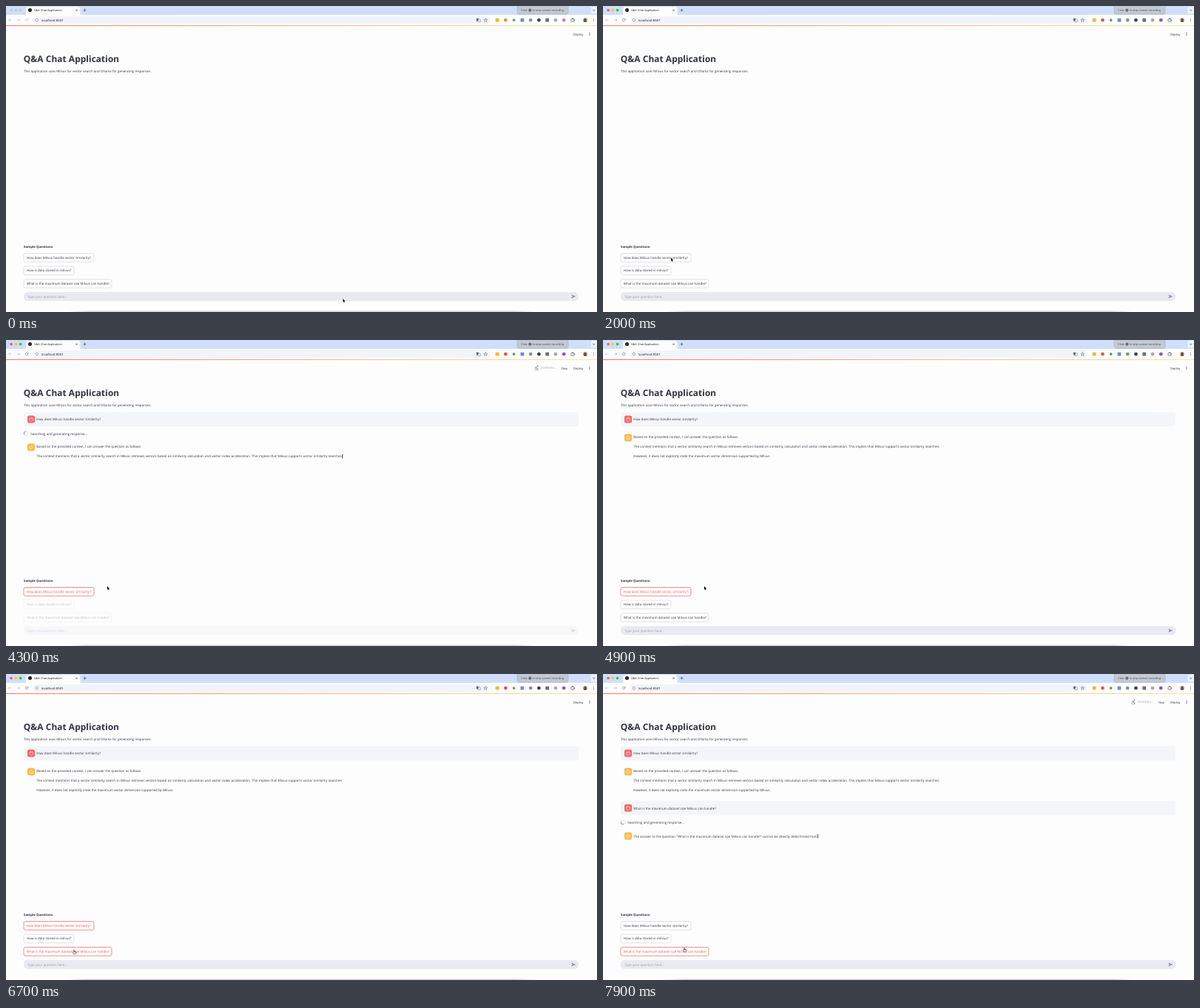
Write an HTML page with a canvas that moves like this. It is 800 by 415 pixels and loops after 8000 ms.

```html
<!DOCTYPE html>
<html lang="en">
<head>
<meta charset="utf-8">
<title>Q&amp;A Chat Application</title>
<style>
html, body { margin: 0; width: 100%; height: 100%; overflow: hidden; background: #fdfdfd; }
canvas { display: block; width: 100vw; height: 100vh; }
</style>
</head>
<body>
<canvas id="stage"></canvas>
<script>
const W = 800, H = 415, LOOP = 8000, STEP = 100;
const canvas = document.getElementById('stage');
const ctx = canvas.getContext('2d');
const ratio = Math.max(1, window.devicePixelRatio || 1);
canvas.width = W * ratio;
canvas.height = H * ratio;

const INK = '#31333f', RED = '#f8504f', GREY = '#5f6368';
const SANS = '"Open Sans", sans-serif', UI = 'Inter, sans-serif';
const BODY = 4.47, RATE = 0.2365;

const QUESTIONS = [
  'How does Milvus handle vector similarity?',
  'How is data stored in milvus?',
  'What is the maximum dataset size Milvus can handle?'
];
const ANSWER = [
  'Based on the provided context, I can answer the question as follows:',
  'The context mentions that a vector similarity search in Milvus retrieves vectors based on similarity calculation and vector index acceleration. This implies that Milvus supports vector similarity searches.',
  'However, it does not explicitly state the maximum vector dimension supported by Milvus.'
];
const ANSWER_2 = ['The answer to the question "What is the maximum dataset size Milvus can handle?" cannot be directly determined from'];

// Moments of the session, in ms
const FOCUS = 300, HOVER_1 = 2200, ASK_1 = 2700, TYPE_1 = 3150, DONE_1 = 4800;
const HOVER_3 = 6350, CLICK_3 = 7100, ASK_2 = 7200, TYPE_2 = 7413;
const POINTER = [
  [300, 456, 397], [600, 400, 385], [900, 400, 385], [1700, 92, 341.5], [2600, 92, 341.5],
  [3000, 137, 334], [5800, 137, 334], [6400, 92, 374], [7100, 92, 374], [7500, 110, 371]
];

// Text is set large and scaled down so that its advances stay fractional
function text(str, x, y, size = BODY, color = INK, family = SANS, weight = 400) {
  ctx.save();
  ctx.translate(x, y);
  ctx.scale(0.1, 0.1);
  ctx.font = `${weight} ${size * 10}px ${family}`;
  ctx.textRendering = 'geometricPrecision';
  ctx.fillStyle = color;
  ctx.fillText(str, 0, 0);
  const width = ctx.measureText(str).width / 10;
  ctx.restore();
  return width;
}

function box(x, y, w, h, r, fill, stroke, line = 0.6) {
  ctx.beginPath();
  ctx.roundRect(x, y, w, h, r);
  if (fill) { ctx.fillStyle = fill; ctx.fill(); }
  if (stroke) { ctx.strokeStyle = stroke; ctx.lineWidth = line; ctx.stroke(); }
}

function dot(x, y, r, fill) {
  ctx.beginPath();
  ctx.arc(x, y, r, 0, 7);
  ctx.fillStyle = fill;
  ctx.fill();
}

function ring(x, y, r, color, line = 0.6, from = 0, to = Math.PI * 2) {
  ctx.beginPath();
  ctx.arc(x, y, r, from, to);
  ctx.strokeStyle = color;
  ctx.lineWidth = line;
  ctx.stroke();
}

function lines(points, color, line = 0.6, fill) {
  ctx.beginPath();
  for (let i = 0; i < points.length; i += 2) ctx.lineTo(points[i], points[i + 1]);
  if (fill) { ctx.closePath(); ctx.fillStyle = fill; ctx.fill(); }
  if (color) { ctx.strokeStyle = color; ctx.lineWidth = line; ctx.stroke(); }
}

function menuDots(x, y, gap, r, color) {
  for (let i = -1; i < 2; i++) dot(x, y + i * gap, r, color);
}

function drawBrowser(active) {
  ctx.fillStyle = '#cfdffb';
  ctx.fillRect(0, 0, W, 12);
  const lights = active ? ['#ff5f57', '#febc2e', '#28c840'] : ['#c3cbd8', '#c3cbd8', '#c3cbd8'];
  lights.forEach((c, i) => dot(7 + i * 6.3, 5.6, 1.9, c));

  box(27, 1.2, 73.5, 12, [3, 3, 0, 0], '#fdfdfd');
  dot(32.5, 5.6, 2.5, '#22252b');
  text('Q&A Chat Application', 38, 7, 3.7, '#1f1f1f', UI);
  lines([94.3, 4.5, 96.7, 6.9], '#333', 0.6);
  lines([96.7, 4.5, 94.3, 6.9], '#333', 0.6);
  lines([104.6, 5.7, 108.6, 5.7], '#333', 0.6);
  lines([106.6, 3.7, 106.6, 7.7], '#333', 0.6);

  box(692, -4, 69, 15.2, 3, '#c3c9d3', '#a5abb6', 0.6);
  text('Click', 697, 7, 3.62, '#44474d', UI);
  ring(709.3, 5.7, 1.7, '#3b3d42', 0.7);
  dot(709.3, 5.7, 0.9, '#3b3d42');
  text('to stop screen recording', 713, 7, 3.62, '#44474d', UI);
  box(791.5, 1, 12, 9.6, 2.5, '#eef4fe');
  lines([794.2, 5, 795.8, 6.5, 797.4, 5], '#333', 0.7);

  ctx.fillStyle = '#fdfdfd';
  ctx.fillRect(0, 12, W, 14.5);
  const faint = '#b4b7bc', reload = active ? GREY : '#b4b7bc';
  lines([7.6, 19, 3.6, 19], faint);
  lines([5.3, 17.2, 3.5, 19, 5.3, 20.8], faint);
  lines([14.6, 19, 18.6, 19], faint);
  lines([16.9, 17.2, 18.7, 19, 16.9, 20.8], faint);
  ring(28.2, 19, 1.8, reload, 0.6, 0.3, 5.4);
  lines([30.2, 16.8, 30.2, 18.6, 28.5, 18.6], reload, 0.5);

  box(36.5, 14.2, 619, 9.8, 4.9, '#f1f4fa');
  dot(41.8, 19, 3, '#fdfdfd');
  ring(41.8, 19, 1.8, GREY, 0.6);
  text('localhost:8501', 48, 20.6, 4.3, '#1f1f1f', UI);
  box(636.8, 16.8, 3, 3.6, 0.5, '#5b6472');
  box(639.2, 18, 3, 3.6, 0.5, '#fdfdfd', '#5b6472', 0.5);
  const star = [];
  for (let i = 0; i <= 10; i++) {
    const r = i % 2 ? 1.1 : 2.6, a = i * Math.PI / 5 - Math.PI / 2;
    star.push(649.2 + r * Math.cos(a), 19.2 + r * Math.sin(a));
  }
  lines(star, '#555a62', 0.5);

  const badges = ['#f4b630', active ? '#e2574c' : '#e08a55', '#58a55c', '#6d8fd0', '#8b8e94',
    '#34415c', '#6b6e74', '#a3a6ab', active ? '#8b4fe0' : '#b783c9'];
  badges.forEach((c, i) => {
    const x = 665 + i * 11.28;
    if (i % 3 === 0) box(x - 2.4, 16.7, 4.8, 4.8, 0.8, c);
    else dot(x, 19.1, i === 2 ? 1.9 : 2.4, c);
  });
  box(764.9, 17.3, 4, 4, 0.8, null, GREY, 0.7);
  dot(767, 17, 0.8, GREY);
  dot(769.2, 19.2, 0.8, GREY);
  dot(784, 19, 3, '#c9a493');
  dot(784, 18.2, 1.3, '#4b3a38');
  box(782, 19.6, 4, 1.9, 1, '#4b3a38');
  menuDots(795.3, 19, 1.6, 0.5, GREY);

  const bar = ctx.createLinearGradient(0, 0, W, 0);
  bar.addColorStop(0, '#f0605c');
  bar.addColorStop(0.5, '#f2a565');
  bar.addColorStop(1, '#f3e79a');
  ctx.fillStyle = bar;
  ctx.fillRect(0, 26.2, W, 0.9);
}

function drawStatus(t, running) {
  text('Deploy', 768, 39.6, 4.14);
  menuDots(790, 38, 1.5, 0.55, INK);
  if (!running) return;
  text('Stop', 751.5, 39.6, 4);
  text('RUNNING...', 724.3, 39.4, 3.9, '#a9aab0');
  const c = '#85878f';
  if (Math.floor(t / STEP) % 3 === 2) {
    ring(715.4, 40, 1.7, c, 0.5);
    ring(720.2, 40, 1.7, c, 0.5);
    lines([715.4, 40, 716.8, 37.2, 718.4, 39, 718, 40.6], c, 0.6);
    lines([716.8, 37.2, 718.6, 35.8, 720.2, 37.4], c, 0.7);
    dot(719.4, 34.8, 0.8, c);
  } else {
    dot(719.6, 35.4, 0.8, c);
    ring(717.6, 39.4, 1.8, c, 0.6);
    lines([715.5, 37.2, 718.6, 36.6, 717.8, 38.8, 719.8, 39.2, 720.4, 41.2], c, 0.7);
  }
}

function drawAvatar(y, user) {
  box(29, y - 5, 10, 10, 2.5, user ? '#fb6163' : '#fbb846');
  const pale = user ? '#ffe3e3' : '#fff0d2';
  if (user) {
    ring(34, y, 2.6, pale, 0.6);
    lines([31.6, y - 0.6, 33.6, y - 1.7, 36.4, y - 0.8], pale, 0.6);
  } else {
    box(31.7, y - 1.7, 4.6, 3.9, 1, null, pale, 0.6);
    lines([34, y - 1.8, 34, y - 2.9], pale, 0.6);
    lines([32.9, y + 1, 35.1, y + 1], pale, 0.5);
  }
  for (const x of [33, 35]) dot(x, y + 0.1, 0.4, pale);
}

function drawQuestion(str, y) {
  box(24, y - 9.6, 751, 19.3, 2.5, '#f4f5f8');
  drawAvatar(y, true);
  text(str, 41.2, y + 1.7);
}

function drawSpinner(t, y) {
  ring(27.2, y, 2.9, '#d8dae0', 0.8);
  const a = t / 750 * Math.PI * 2;
  ring(27.2, y, 2.9, '#5472b8', 0.8, a - 2, a);
  text('Searching and generating response...', 33.2, y + 1.7);
}

function drawAnswer(parts, y, count, typing) {
  drawAvatar(y, false);
  const single = count <= parts[0].length;
  let base = y + (single ? 1.7 : 0.8), left = count;
  for (const part of parts) {
    const shown = part.slice(0, left);
    left -= shown.length;
    const w = text(shown, 41.2, base);
    if (left <= 0) {
      if (typing) {
        ctx.fillStyle = INK;
        ctx.fillRect(41.6 + w, base - 4.4, 0.9, 5.6);
      }
      return;
    }
    base += 13;
  }
}

function drawTurn(t, y, question, parts, ask, start, done) {
  if (t < ask) return;
  drawQuestion(question, y);
  const busy = t < done;
  const spinning = busy && t >= start + 200;
  if (spinning) drawSpinner(t, y + 19.2);
  if (t < start) return;
  const count = busy ? Math.round((t - start) * RATE) : 1e4;
  drawAnswer(parts, y + (spinning ? 38 : 25), count, busy);
}

function drawForm(t) {
  text('Sample Questions:', 24, 327.5, 4.34, INK, SANS, 700);
  const stale = t >= ASK_1 && t < DONE_1 ? Math.min(1, Math.max(0, (t - 3600) / 600)) : 0;
  const hot = [t >= HOVER_1 && t < CLICK_3, false, t >= HOVER_3];
  const widths = [95, 68, 119];
  QUESTIONS.forEach((q, i) => {
    const y = 341.3 + i * 17.55;
    ctx.globalAlpha = hot[i] ? 1 : 1 - 0.68 * stale;
    box(24, y - 5.8, widths[i], 11.6, 2.2, '#fefefe', hot[i] ? '#e2605f' : '#d5d6da', 0.7);
    text(q, 28, y + 1.6, BODY, hot[i] ? RED : INK);
  });
  ctx.globalAlpha = 1 - 0.68 * stale;
  box(24, 388, 751, 12, 5, '#e9eaf1');
  text('Type your question here...', 29, 395.5, 4.44, '#9899a3');
  lines([765.6, 391.5, 771, 394, 765.6, 396.5, 766, 394.5, 769, 394, 766, 393.5], null, 0, '#85868f');
  ctx.globalAlpha = 1;
}

function pointerAt(t) {
  let prev = POINTER[0];
  for (const next of POINTER) {
    if (t < next[0]) {
      const u = Math.max(0, (t - prev[0]) / (next[0] - prev[0] || 1));
      const e = u * u * (3 - 2 * u);
      return [1, 2].map(k => prev[k] + (next[k] - prev[k]) * e);
    }
    prev = next;
  }
  return [prev[1], prev[2]];
}

function drawPointer(t) {
  const [x, y] = pointerAt(t);
  ctx.save();
  ctx.translate(x, y);
  ctx.lineJoin = 'round';
  if (t >= HOVER_3 || (t >= HOVER_1 && t < ASK_1)) {
    box(-0.5, 0, 1.2, 4, 0.6, '#fff', '#222', 0.5);
    box(-1.1, 2.4, 3.9, 3.4, 1.1, '#fff', '#222', 0.6);
    lines([0.8, 2.6, 0.8, 4], '#222', 0.4);
    lines([1.8, 2.6, 1.8, 4], '#222', 0.4);
  } else {
    lines([0, 0, 0, 4.5, 1.1, 3.6, 1.8, 5.3, 2.6, 4.9, 1.9, 3.3, 3.2, 3.2], '#fff', 0.9, '#000');
    lines([0, 0, 0, 4.5, 1.1, 3.6, 1.8, 5.3, 2.6, 4.9, 1.9, 3.3, 3.2, 3.2], null, 0, '#000');
  }
  ctx.restore();
}

function drawDockEdge() {
  const g = ctx.createLinearGradient(85, 0, 715, 0);
  g.addColorStop(0, 'rgba(205,205,207,0)');
  g.addColorStop(0.04, '#d3d3d5');
  g.addColorStop(0.96, '#d3d3d5');
  g.addColorStop(1, 'rgba(205,205,207,0)');
  ctx.fillStyle = g;
  ctx.fillRect(85, 413.6, 630, 1.4);
}

function draw(t) {
  ctx.setTransform(ratio, 0, 0, ratio, 0, 0);
  ctx.fillStyle = '#fdfdfd';
  ctx.fillRect(0, 0, W, H);
  drawBrowser(t >= FOCUS);
  drawStatus(t, (t >= ASK_1 && t < DONE_1) || t >= ASK_2);
  text('Q&A Chat Application', 23.8, 76, 12, INK, SANS, 700);
  text('This application uses Milvus for vector search and Ollama for generating responses.', 24, 90.3, 4.45);
  drawTurn(t, 107.6, QUESTIONS[0], ANSWER, ASK_1, TYPE_1, DONE_1);
  drawTurn(t, 181.8, QUESTIONS[2], ANSWER_2, ASK_2, TYPE_2, LOOP);
  drawForm(t);
  drawDockEdge();
  drawPointer(t);
}

const begin = performance.now();
function tick() {
  const t = (performance.now() - begin) % LOOP;
  draw(Math.floor(t / STEP) * STEP);
  requestAnimationFrame(tick);
}
tick();
</script>
</body>
</html>
```
